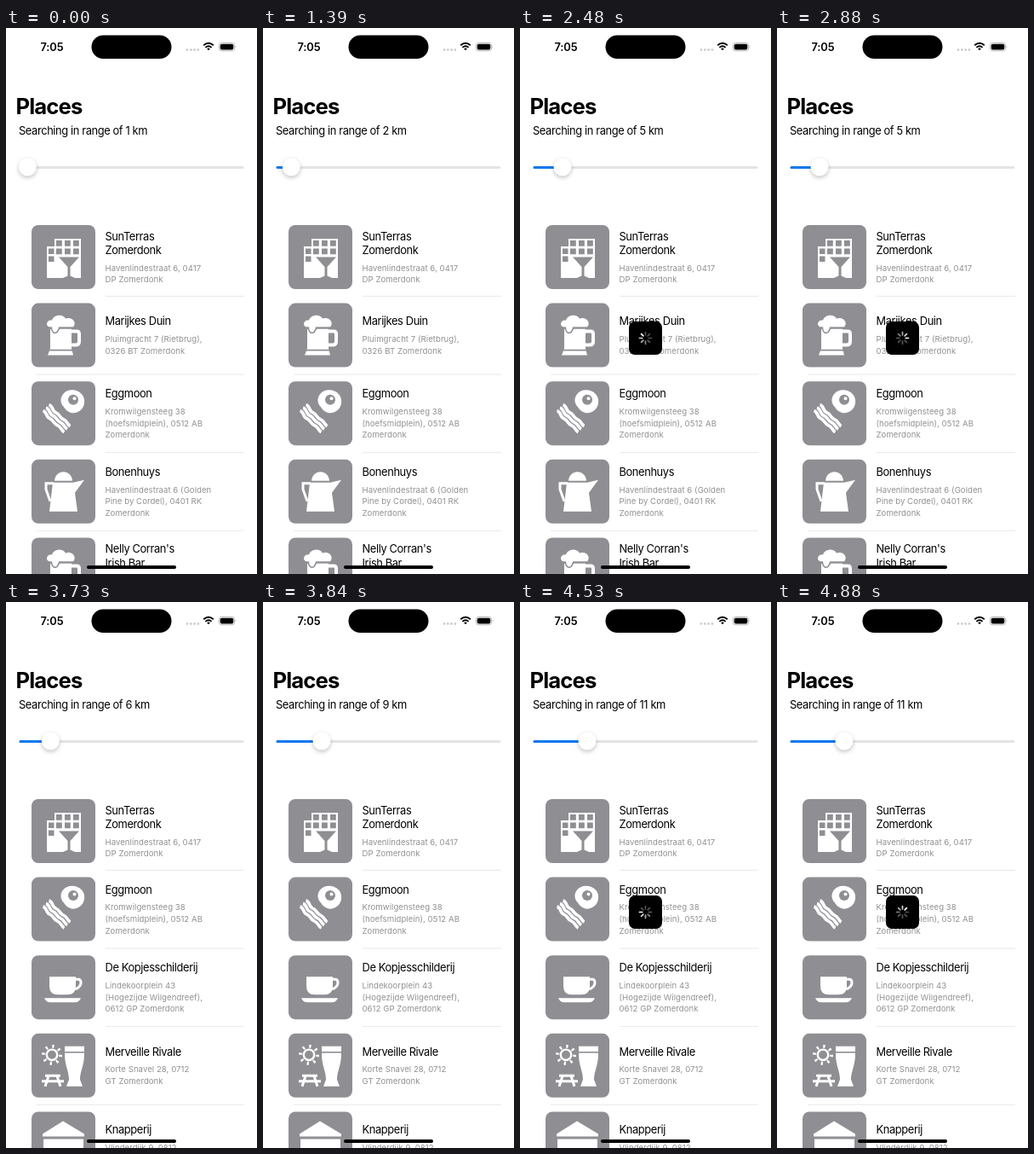
Recreate the animation shown at these times as an HTML page. Size 295 by 640 pixels, loop 4930 ms.

```html
<!DOCTYPE html>
<html lang="en">
<head>
<meta charset="utf-8">
<title>Places</title>
<style>
  html, body { margin: 0; width: 100%; height: 100%; overflow: hidden; background: #fff; }
  svg { display: block; }
  #stage { width: 100vw; height: 100vh; font-family: Inter, "Open Sans", sans-serif; }
  .title { font-size: 25.7px; font-weight: 700; letter-spacing: -.035em; }
  .time { font-size: 12.86px; font-weight: 600; letter-spacing: -.01em; }
  .body { font-size: 12.86px; letter-spacing: -.03em; }
  .note { font-size: 9.6px; letter-spacing: .005em; fill: #919195; }
  .line { stroke: #e2e2e4; stroke-width: .8; }
  .glyph { fill: #fff; stroke: none; stroke-width: 3; }
  .glyph .ink { fill: #8e8e93; }
  .glyph .pen { fill: none; stroke: #fff; }
  .glyph .cut { fill: none; stroke: #8e8e93; stroke-width: 1.6; }
  .knob { fill: #fff; filter: drop-shadow(0 2px 2.5px rgba(0, 0, 0, .24)); }
</style>
</head>
<body>
<svg id="stage" viewBox="0 0 295 640">
  <defs>
    <g id="rooftop" class="glyph">
      <path d="M18 25H27V16H58V62H18Z"/>
      <path class="ink" d="M20 27.500h6.500v6.500h-6.500zM20 36.500h6.500v6.500h-6.500zM29 18h6.800v6.800h-6.800zM39 18h6.800v6.800h-6.800zM49 18h6.800v6.800h-6.800zM29 27.500h6.800v6.800h-6.800zM39 27.500h6.800v6.800h-6.800zM49 27.500h6.800v6.800h-6.800z"/>
      <path class="ink" d="M32 37.500H56L45.500 49V59.500L51 62H37L42.500 59.500V49Z"/>
    </g>
    <g id="mug" class="glyph">
      <path d="M22 30H47V53L49 61H19L22 53Z"/>
      <path class="pen" stroke-width="4" d="M47 33H53Q56 33 56 36V45Q56 49 52 49H47"/>
      <path d="M22 28C16 28 17 19 24 20C26 13 37 12 40 18C47 15 54 22 49 28H32C31 35 25 35 24 28Z"/>
      <path class="cut" d="M21 29H23Q25 37 30 34L33 29H50M21 55H48"/>
    </g>
    <g id="breakfast" class="glyph">
      <path d="M37 15C42 8 54 9 59 15C65 22 62 33 54 36C47 39 41 35 38 30C34 26 33 20 37 15Z"/>
      <circle class="ink" cx="49" cy="21.500" r="6"/>
      <circle cx="50.500" cy="20" r="2"/>
      <g class="pen" stroke-width="3.700">
        <path id="rasher" d="M17 31C22 32 20 38 25 40S29 46 34 48S38 54 42 56"/>
        <use href="#rasher" x="3.500" y="-3.500"/>
        <use href="#rasher" x="-3.500" y="3.500"/>
      </g>
    </g>
    <g id="jug" class="glyph">
      <path d="M27 25C28 11 47 11 48 25Z"/>
      <path d="M62 24L49 27H25L21 61H54L51 39Z"/>
      <path class="pen" d="M26 28H17V35L22 49"/>
    </g>
    <g id="cup" class="glyph">
      <path d="M21 25H52V36Q52 46 42 46H31Q21 46 21 36Z"/>
      <path class="pen" d="M51 28H55Q58 28 58 32T53 39H50"/>
      <path d="M15 50H58Q56 55 51 55H22Q17 55 15 50Z"/>
    </g>
    <g id="garden" class="glyph">
      <circle class="pen" cx="24" cy="25" r="6.200" stroke-width="2.400"/>
      <circle class="pen" cx="24" cy="25" r="10" stroke-width="4" stroke-dasharray="2.300 5.550"/>
      <path class="pen" d="M16 49.500H34M12 56H38M20 50L16 62M30 50L34 62"/>
      <path d="M39 15H62V24C62 38 57 44 57 54L60 62H41L44 54C44 44 39 38 39 24Z"/>
      <path class="cut" d="M39 22H62"/>
    </g>
    <g id="toast" class="glyph">
      <path d="M13 26L37 11L62 26V29H13Z"/>
      <path d="M14 32H61V44H14Z"/>
    </g>
  </defs>

  <rect width="295" height="640" fill="#fff"/>
  <text class="time" x="40.500" y="26.500">7:05</text>
  <rect x="100.500" y="8.500" width="94" height="27.500" rx="13.750"/>
  <g fill="#c4c4c6">
    <circle cx="213" cy="25.500" r="1.300"/><circle cx="217.300" cy="25.500" r="1.300"/>
    <circle cx="221.600" cy="25.500" r="1.300"/><circle cx="225.900" cy="25.500" r="1.300"/>
  </g>
  <g fill="none" stroke="#000" stroke-width="1.900">
    <path d="M232.200 20.300Q238 15.300 243.800 20.300M234.400 22.900Q238 19.700 241.600 22.900"/>
    <path d="M236.200 24.300Q238 22.800 239.800 24.300L238 26.200Z" fill="#000" stroke="none"/>
  </g>
  <rect x="250.400" y="17.400" width="18.200" height="9.400" rx="3" fill="none" stroke="#a5a5a7" stroke-width=".8"/>
  <rect x="251.700" y="18.700" width="15.600" height="6.800" rx="1.900"/>
  <path d="M269.700 20.500Q271.200 22 269.700 23.500Z" fill="#a5a5a7"/>

  <text class="title" x="11.500" y="100.500">Places</text>
  <text class="body" id="range" x="15" y="124.700"></text>
  <rect x="15.500" y="162" width="264" height="3" rx="1.500" fill="#e4e4e6"/>
  <rect id="fill" x="15.500" y="162" height="3" rx="1.500" fill="#0a78ee"/>
  <circle id="knob" class="knob" cy="163" r="10.500"/>

  <g id="before"></g>
  <g id="after"></g>

  <g id="loader">
    <rect x="128" y="344" width="39" height="39" rx="7"/>
    <g transform="translate(147.500 363.500)"><g id="spokes" stroke="#fff" stroke-width="1.700" stroke-linecap="round"></g></g>
  </g>
  <rect x="95" y="630" width="105" height="4" rx="2"/>
</svg>
<script>
const LOOP = 4930;
const PITCH = 91.6;
const $ = id => document.getElementById(id);

const rooftop = ['rooftop', 'SunTerras|Zomerdonk', 'Havenlindestraat 6, 0417|DP Zomerdonk'];
const breakfast = ['breakfast', 'Eggmoon', 'Kromwilgensteeg 38|(hoefsmidplein), 0512 AB|Zomerdonk'];

const before = [
  rooftop,
  ['mug', 'Marijkes Duin', 'Pluimgracht 7 (Rietbrug),|0326 BT Zomerdonk'],
  breakfast,
  ['jug', 'Bonenhuys', 'Havenlindestraat 6 (Golden|Pine by Cordel), 0401 RK|Zomerdonk'],
  ['mug', "Nelly Corran's|Irish Bar", 'Turfhoek 3, 0418|DR Zomerdonk'],
];
const after = [
  rooftop,
  breakfast,
  ['cup', 'De Kopjesschilderij', 'Lindekoorplein 43|(Hogezijde Wilgendreef),|0612 GP Zomerdonk'],
  ['garden', 'Merveille Rivale', 'Korte Snavel 28, 0712|GT Zomerdonk'],
  ['toast', 'Knapperij', 'Vlinderdijk 9, 0812|GW Zomerdonk'],
];

const textLines = (lines, cls, y, step) => lines.map((line, i) =>
  `<text class="${cls}" x="116.500" y="${y + i * step}">${line}</text>`).join('');

// Text blocks are centred vertically on their icon.
function row([icon, name, address], i, lineStart) {
  const top = 231 + i * PITCH;
  const names = name.split('|'), notes = address.split('|');
  const nameHeight = names.length * 16.6;
  const textTop = top + 37.5 - (nameHeight + notes.length * 13.6 + 4) / 2;
  return `<rect x="30" y="${top}" width="75" height="75" rx="8" fill="#8e8e93"/>
    <use href="#${icon}" x="30" y="${top}"/>
    ${textLines(names, 'body', textTop + 12.2, 16.6)}
    ${textLines(notes, 'note', textTop + nameHeight + 15.3, 13.6)}
    <path class="line" d="M${lineStart} ${top + 83.4}H280"/>`;
}

const fillList = (id, rows, wideLines) => {
  $(id).innerHTML = rows.map((r, i) => row(r, i, wideLines.includes(i) ? 36 : 117)).join('');
};
fillList('before', before, [1, 3]);
fillList('after', after, [3]);

$('spokes').innerHTML = Array.from({ length: 8 }, (_, i) =>
  `<path d="M0 -3.700V-7" transform="rotate(${-45 * i})" opacity="${Math.max(.32, 1 - i * .16)}"/>`).join('');

// start time, kilometres, knob x, list, spinner step (null hides it)
const states = [
  [0, 1, 25.3, 'before', null],
  [1390, 2, 33.3, 'before', null],
  [1500, 5, 49.5, 'before', null],
  [2480, 5, 50, 'before', -1],
  [2630, 5, 50, 'before', 0],
  [2730, 5, 50, 'before', 1],
  [2880, 5, 50, 'before', 2],
  [3730, 6, 52.3, 'after', null],
  [3840, 9, 69, 'after', null],
  [3960, 11, 78.3, 'after', null],
  [4530, 11, 79, 'after', -2],
  [4630, 11, 79, 'after', -1],
  [4730, 11, 79, 'after', 0],
  [4880, 11, 79, 'after', 1],
];

const show = (id, on) => $(id).setAttribute('display', on ? 'inline' : 'none');
const start = performance.now();
let shown;

function draw() {
  const time = (performance.now() - start) % LOOP;
  const state = states.findLast(s => s[0] <= time);
  if (state !== shown) {
    shown = state;
    const [, km, x, list, step] = state;
    $('range').textContent = `Searching in range of ${km} km`;
    $('knob').setAttribute('cx', x);
    $('fill').setAttribute('width', x - 15.5);
    // The fill stays hidden while the knob rests at the minimum.
    show('fill', km > 1);
    show('before', list === 'before');
    show('after', list === 'after');
    show('loader', step !== null);
    $('spokes').setAttribute('transform', `rotate(${45 * (step ?? 0)})`);
  }
  requestAnimationFrame(draw);
}
draw();
</script>
</body>
</html>
```
